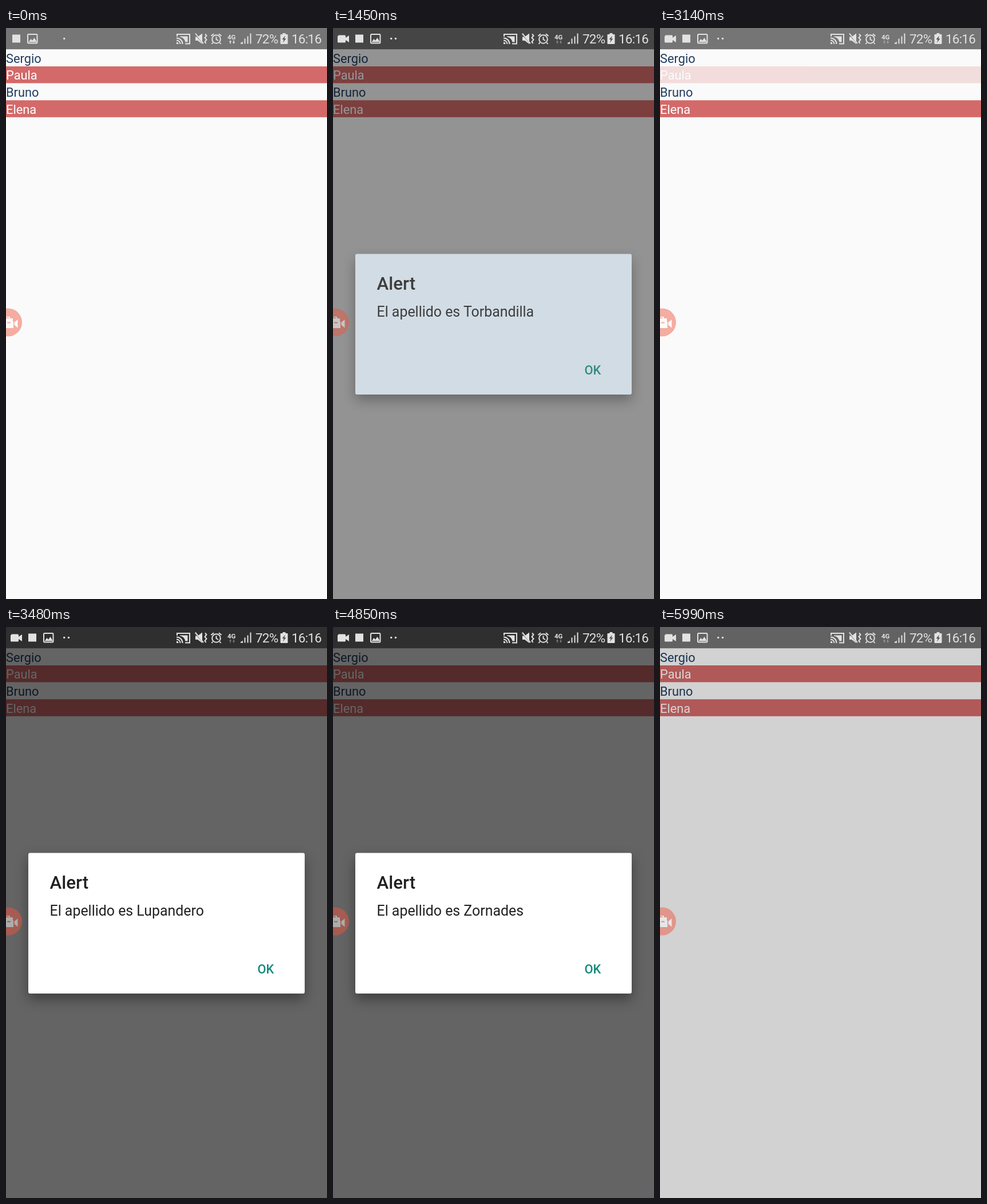
Write an HTML page that moves like this. It is 561x997 px and loops after 6050 ms.

```html
<!DOCTYPE html>
<html lang="es">
<head>
<meta charset="utf-8">
<title>Lista con alertas</title>
<style>
html, body { margin: 0; width: 100%; height: 100%; overflow: hidden; background: #fafafa; }
svg { display: block; width: 561px; height: 997px; font-family: Roboto, "Noto Sans", sans-serif; }
.name { font-size: 21.8px; }
.line { fill: none; stroke: #e2e2e2; stroke-width: 2; }
.status text { font-size: 22.5px; letter-spacing: -.8px; }
#box { filter: drop-shadow(0 10px 11px rgba(0,0,0,.38)); }
</style>
</head>
<body>
<svg viewBox="0 0 561 997">
  <rect width="561" height="997" fill="#fafafa"/>
  <rect width="561" height="37.4" fill="#757575"/>
  <g id="rows"></g>
  <rect id="dim" width="561" height="997"/>

  <g id="dialog" fill="#212121">
    <rect id="box" x="39" y="394.5" width="483" height="245.5" rx="3"/>
    <text x="76.5" y="456.5" font-size="31.2" font-weight="500">Alert</text>
    <text id="message" x="76.5" y="504" font-size="24.9"></text>
    <text x="439.5" y="604.5" font-size="21.8" font-weight="500" fill="#12897b">OK</text>
  </g>

  <g class="status" fill="#e2e2e2">
    <path id="camera" d="M9.5 12.500h11q1.500 0 1.500 1.500v3l6-4v12l-6-4v3q0 1.500-1.500 1.500h-11q-1.500 0-1.500-1.500v-9q0-1.500 1.500-1.500z"/>
    <g id="notices">
      <rect x="39" y="11.500" width="14" height="14"/>
      <rect class="line" x="66" y="11" width="16.500" height="15.500" rx="1.500"/>
      <path d="M67.500 24.500l4-5.500 2.500 3 3.500-5 4.500 7.500z"/>
    </g>
    <circle cx="101.700" cy="18.500" r="1.700"/>
    <circle id="dot" cx="109.500" cy="18.500" r="1.700"/>

    <!-- cast -->
    <path class="line" d="M299 15v-4h22v16.500h-8"/>
    <path d="M304 14.500h13.500v10h-4q-2-8-9.500-9z"/>
    <path class="line" d="M298 17.500a10.500 10.500 0 0 1 10.500 10.500M298 21.500a6.500 6.500 0 0 1 6.500 6.500"/>
    <path d="M298 24.500a3.500 3.500 0 0 1 3.500 3.500h-3.500z"/>
    <!-- muted, vibrating -->
    <path d="M331 15.500h4l8-6v18.500l-8-6h-4z"/>
    <path d="M330 10.500l15 17" stroke="#757575" stroke-width="1.500"/>
    <path class="line" d="M331 9.500l14 17.500M348 10.500l2.500 3-3 3.500 3 3.500-3 3.500 2 3" stroke-width="1.800"/>
    <!-- alarm -->
    <circle class="line" cx="367.500" cy="19.500" r="7.300" stroke-width="2.400"/>
    <path class="line" d="M358.500 14l4.500-3.800M376.500 14l-4.500-3.800M361.500 25.500l-2 2.500M373.500 25.500l2 2.500M367.500 15.500v4.500l3.500 2"/>
    <!-- mobile data -->
    <text x="387" y="19.700" style="font-size:11.500px;letter-spacing:0" font-weight="700">4G</text>
    <path id="arrows" d="M392 21.500l2.300 2.700h-1.500v3.300h-1.600v-3.300h-1.500zM398 27.500l2.300-2.700h-1.500v-3.300h-1.600v3.300h-1.500z"/>
    <path class="line" d="M410 26.500h4M417.500 27.500v-9M422.500 27.500v-13M427.500 27.500v-18" stroke-width="1.500"/>
    <path d="M410 27.500l4-4v4z"/>
    <text x="436" y="27">72%</text>
    <!-- battery -->
    <path d="M483.500 9h5v2h3q1 0 1 1v15q0 1-1 1h-11q-1 0-1-1v-15q0-1 1-1h3z"/>
    <path d="M488 13.500l-5.500 6.500h3l-1.500 5.500 5.500-7h-3z" fill="#555"/>
    <text x="499" y="27">16:16</text>
  </g>

  <g opacity=".47">
    <circle cx="3.500" cy="514" r="24.500" fill="#f0553e"/>
    <path d="M0 507h1v-3h6v3h5v5.500h1v11.500h-13z" fill="#fff"/>
    <path d="M1 507v-1.500h4v1.500zM2 513.500h6v2h-6z" fill="#f0553e"/>
    <path d="M20.500 509v14.500l-6-5v-4.500z" fill="#fff"/>
  </g>
</svg>
<script>
const LOOP = 6050, ROW = 29.6;
const names = ["Sergio", "Paula", "Bruno", "Elena"];

const ticks = [0, 70, 140, 210, 280, 350, 670, 1090, 1310, 1380, 1450, 1510, 1820,
  2460, 2550, 2610, 2670, 2980, 3140, 3230, 3300, 3360, 3420, 3480,
  3970, 4040, 4100, 4160, 4640, 4710, 4780, 4850, 5860, 5930, 5990];

const taps = [
  { row: 0, down: 520, up: 1250 },
  { row: 1, down: 2920, up: 3170 },
  { row: 3, down: 4010, up: 4580 }
];
const alerts = [
  { open: 1320, close: 2443, surname: "Torbandilla" },
  { open: 3290, close: 3953, surname: "Lupandero" },
  { open: 4660, close: 5843, surname: "Zornades" }
];

const $ = id => document.getElementById(id);
const clamp = x => Math.max(0, Math.min(1, x));

$("rows").innerHTML = names.map((name, i) => {
  const y = 37.4 + i * ROW, odd = i % 2;
  return `<g><rect y="${y}" width="561" height="${ROW}" fill="${odd ? "#d36a69" : "#fafafa"}"/>
    <text class="name" x="0" y="${y + 23.4}" fill="${odd ? "#fff" : "#1f3d60"}">${name}</text></g>`;
}).join("");
const rows = [...$("rows").children];

function drawRows(t) {
  rows.forEach(row => row.setAttribute("opacity", 1));
  for (const { row, down, up } of taps) {
    if (t < down) continue;
    const alpha = t < up ? 1 - .8 * clamp((t - down) / 150) : .2 + .8 * clamp((t - up) / 150);
    rows[row].setAttribute("opacity", alpha);
  }
}

function drawAlert(t) {
  let dim = 0, alpha = 0;
  const alert = alerts.findLast(a => t >= a.open);
  if (alert) {
    const shown = clamp((t - alert.open) / 190), gone = t - alert.close;
    dim = .6 * shown * (1 - clamp(gone / 200));
    alpha = clamp(shown * 1.1) * (1 - clamp(gone / 150)) ** 3;
    $("message").textContent = "El apellido es " + alert.surname;
    $("box").setAttribute("fill", shown < 1 ? "#e7f4ff" : "#fff");
  }
  $("dim").setAttribute("opacity", dim);
  $("dialog").setAttribute("opacity", alpha);
}

function drawStatus(t) {
  const p = clamp(t / 350);
  $("camera").setAttribute("opacity", p);
  $("dot").setAttribute("opacity", p);
  $("notices").setAttribute("transform", `translate(${28 * (p - 1)})`);
  const busy = t < 1090 || (t >= 1820 && t < 2550);
  $("arrows").setAttribute("opacity", busy ? 1 : .4);
}

function frame(now) {
  const t = ticks.findLast(x => x <= now % LOOP);
  drawRows(t);
  drawAlert(t);
  drawStatus(t);
  requestAnimationFrame(frame);
}
frame(0);
</script>
</body>
</html>
```
